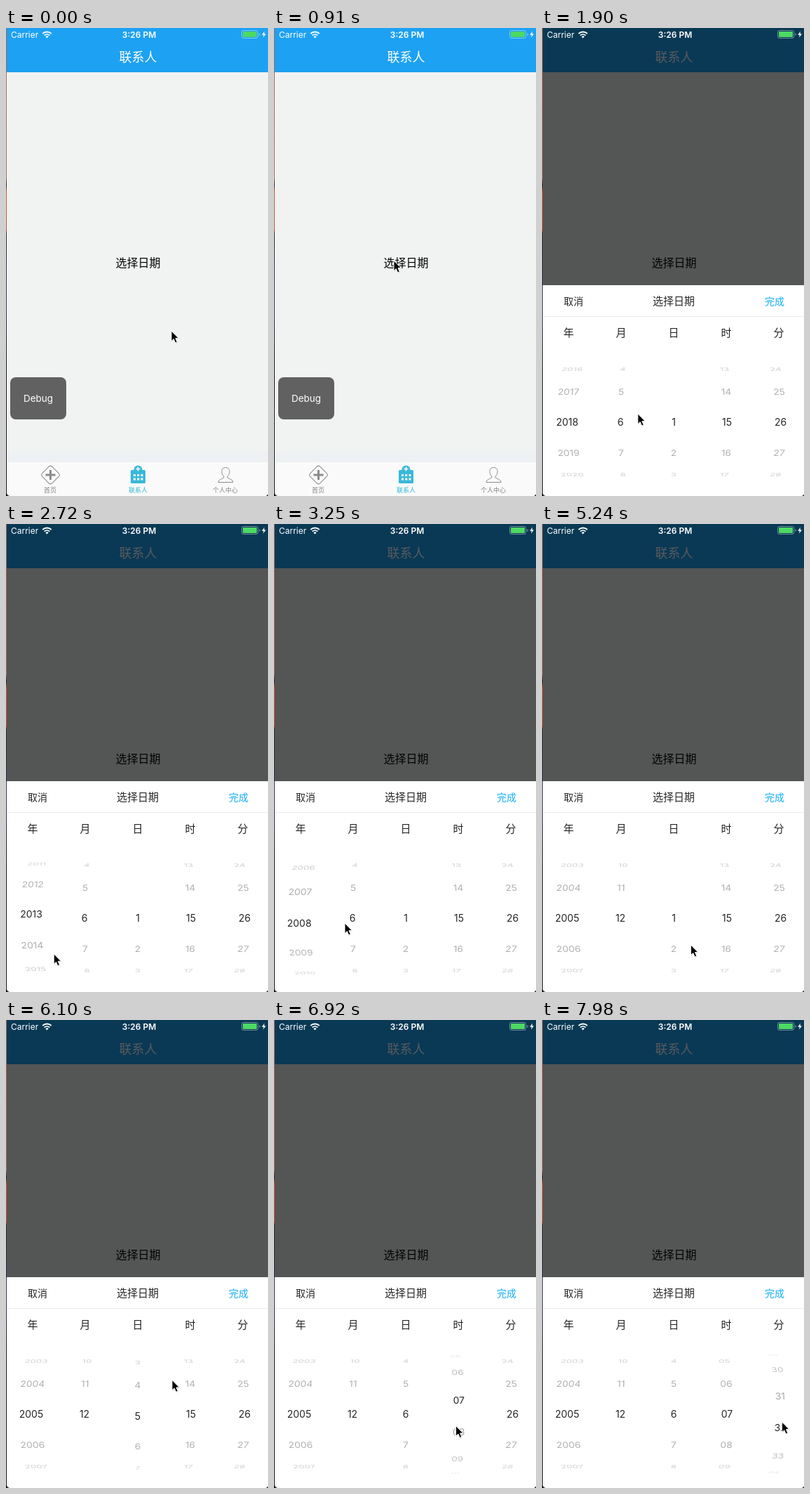
An HTML page for the animation above (8000 ms loop, 374 by 666 pixels).

```html
<!DOCTYPE html>
<html lang="zh-CN">
<head>
<meta charset="utf-8">
<title>Date picker</title>
<style>
  html, body { margin: 0; width: 100%; height: 100%; overflow: hidden; background: #f1f3f3; }
  svg { display: block; width: 374px; height: 666px; }
  text { font-family: Inter, "Noto Sans CJK SC", "Noto Sans CJK", sans-serif; text-anchor: middle; }
  .tab { font-size: 9px; fill: #858585; }
  .head { font-size: 15px; fill: #262626; }
  #wheels text { font-size: 14px; fill: #262626; }
</style>
</head>
<body>
<svg viewBox="0 0 374 666">
  <defs>
    <linearGradient id="edge" x1="0" y1="0" x2="0" y2="1">
      <stop offset="0" stop-color="#b0644c"/>
      <stop offset=".32" stop-color="#a8665a"/>
      <stop offset=".335" stop-color="#2b2220"/>
      <stop offset=".35" stop-color="#d8552a"/>
      <stop offset=".43" stop-color="#cc4f2c"/>
      <stop offset=".44" stop-color="#2a2c38"/>
      <stop offset=".6" stop-color="#2c3a52"/>
      <stop offset=".72" stop-color="#15151b"/>
    </linearGradient>
    <path id="arrow" d="M0 0V14.6L3.3 11.6 5.6 17 8.3 15.8 6 10.6H10.4Z"/>
  </defs>

  <!-- page -->
  <rect width="374" height="666" fill="#f1f3f3"/>
  <rect y="604" width="374" height="14" fill="#eef1f3"/>
  <rect width="374" height="63" fill="#1da1f2"/>
  <text x="188.5" y="47.5" font-size="18" fill="#fff">联系人</text>
  <text x="188.5" y="340" font-size="16">选择日期</text>
  <rect x="6" y="497" width="80" height="60" rx="8" fill="#616161"/>
  <text x="46" y="532" font-size="13.5" fill="#fff">Debug</text>

  <!-- tab bar -->
  <rect y="618" width="374" height="48" fill="#fafafa"/>
  <g stroke="#8c8c8c" fill="none">
    <rect x="53.5" y="626" width="20" height="20" rx="3.5" transform="rotate(45 63.5 636)"/>
    <path d="M63.5 629v14M56.5 636h14" stroke-width="3"/>
    <path d="M313.5 625.5c-4 0-5.8 2.8-5.6 6 .2 3 1.400 5 3 6.400v2c-1.500 1.600-8 2.400-8 6.600h21.200c0-4.200-6.500-5-8-6.600v-2c1.600-1.400 2.800-3.400 3-6.400 .2-3.200-1.600-6-5.600-6z"/>
  </g>
  <g fill="#38b9d8">
    <rect x="178" y="629" width="21" height="19" rx="1.5"/>
    <circle cx="188.5" cy="628.5" r="6"/>
    <path d="M188.5 624.5v6M185.5 627.5h6" stroke="#fff" stroke-width="1.6"/>
    <path d="M182 636.5h13.5M182 642h13.5" stroke="#fff" stroke-width="3" stroke-dasharray="3 2.25"/>
  </g>
  <text class="tab" x="63" y="661.3">首页</text>
  <text class="tab" x="188.5" y="661.3" style="fill:#2fb6d6">联系人</text>
  <text class="tab" x="313" y="661.3">个人中心</text>

  <rect id="dim" width="374" height="666" fill="#000302" opacity=".65"/>

  <!-- status bar -->
  <g fill="#fff">
    <text x="7" y="13.5" font-size="12" style="text-anchor:start">Carrier</text>
    <text x="190" y="13.5" font-size="12" font-weight="600">3:26 PM</text>
    <path d="M52.3 8a9 9 0 0 1 12.4 0M54.7 10.6a5.6 5.6 0 0 1 7.6 0" fill="none" stroke="#fff" stroke-width="1.9"/>
    <path d="M58.5 14.6l-2.1-2.3a3 3 0 0 1 4.2 0z"/>
    <rect x="336.5" y="3.5" width="23" height="11" rx="2.5" fill="none" stroke="#fff" stroke-opacity=".42"/>
    <rect x="338" y="5" width="20" height="8" rx="1.2" fill="#4cd964"/>
    <path d="M361.3 7.300q1.600 .4 1.600 1.800t-1.600 1.800z" fill-opacity=".45"/>
    <path d="M369 4.500l-3.800 5.200h2.600l-.8 4 3.900-5.400h-2.600z"/>
  </g>

  <!-- date sheet -->
  <g id="sheet">
    <rect y="366" width="374" height="300" fill="#fff"/>
    <rect y="410" width="374" height="1" fill="#ededed"/>
    <text x="45" y="393.5" font-size="14" fill="#262626">取消</text>
    <text class="head" x="188" y="394">选择日期</text>
    <text x="332" y="393.5" font-size="14" fill="#14b0fa">完成</text>
    <g id="wheels"></g>
  </g>

  <rect width="1" height="666" fill="url(#edge)"/>
  <path d="M0 661.5h1q.4 3.500 4 4.500H0zM374 663v3h-3q2.500-.5 3-3z" fill="#15151b"/>

  <g id="cursor">
    <use href="#arrow" x=".6" y="1" opacity=".18"/>
    <use href="#arrow" stroke="#fff" stroke-linejoin="round"/>
  </g>
</svg>

<script>
const LOOP = 8000, OPEN = 1120;
const MID_X = 187, MID_Y = 561, RADIUS = 85.7, STEP = 30.5 * Math.PI / 180, DEPTH = 0.09;

// each wheel spins once: from -> to, slowing down between start and end
const columns = [
  { head: "年", x: 36, min: 1900, max: 2100, pad: 4, from: 2018, to: 2005, start: 2380, end: 4050, power: 2.06 },
  { head: "月", x: 112, min: 1, max: 12, pad: 1, from: 6, to: 12, start: 4260, end: 5300, power: 3 },
  { head: "日", x: 188, min: 1, max: 31, pad: 1, from: 1, to: 6, start: 5680, end: 6460, power: 2 },
  { head: "时", x: 264, min: 0, max: 23, pad: 2, from: 15, to: 7, start: 6570, end: 7400, power: 5.3 },
  { head: "分", x: 340.5, min: 0, max: 59, pad: 2, from: 26, to: 32, start: 7400, end: 8250, power: 2.3 }
];

// cursor tip: ms, x, y
const path = [
  [60, 236, 431], [320, 170, 325], [500, 170, 325], [620, 171, 331], [1570, 171, 331],
  [1740, 202, 450], [1900, 137, 549], [2320, 52, 550], [2620, 62, 620], [3250, 101, 568],
  [4250, 114.5, 575], [4500, 122, 431], [5240, 212.5, 599], [5680, 197, 585], [5850, 200, 500],
  [6460, 290, 530], [6640, 254, 500], [6920, 259.5, 577], [7060, 275, 640], [7400, 344, 605],
  [7720, 341, 500], [7980, 342.5, 572]
];

const el = id => document.getElementById(id);
const SLOTS = [-3, -2, -1, 0, 1, 2, 3];

function addText(y, props) {
  const node = document.createElementNS("http://www.w3.org/2000/svg", "text");
  node.setAttribute("y", y);
  for (const key in props) node.setAttribute(key, props[key]);
  el("wheels").append(node);
  return node;
}

columns.forEach((col, i) => {
  const head = addText(439, { x: 38 + 75 * i, style: "font-size:15px" });
  head.textContent = col.head;
  col.texts = SLOTS.map(() => addText(5));
});

function position(col, t) {
  const u = Math.min(1, Math.max(0, (t - col.start) / (col.end - col.start)));
  return col.to + (col.from - col.to) * (1 - u) ** col.power;
}

// rows sit on a cylinder seen from the middle of the sheet
function drawWheel(col, t) {
  const pos = position(col, t), base = Math.round(pos);
  const off = MID_X - col.x;
  SLOTS.forEach((slot, i) => {
    const node = col.texts[i];
    const n = base + slot, angle = (n - pos) * STEP;
    const show = n >= col.min && n <= col.max && Math.abs(angle) < 1.53;
    node.style.display = show ? "" : "none";
    if (!show) return;
    const cos = Math.cos(angle), sin = Math.sin(angle);
    const scale = 1 - DEPTH * (1 - cos);
    const skew = off * DEPTH * sin / RADIUS;
    node.textContent = String(n).padStart(col.pad, "0");
    node.setAttribute("transform",
      `matrix(${scale} 0 ${skew} ${cos} ${MID_X - off * scale} ${MID_Y + RADIUS * sin})`);
    node.setAttribute("opacity", slot ? 0.02 + 0.4 * cos : 1);
  });
}

function cursorAt(t) {
  const i = path.findIndex(p => p[0] > t);
  if (i === 0) return path[0];
  if (i < 0) return path[path.length - 1];
  const a = path[i - 1], b = path[i], u = (t - a[0]) / (b[0] - a[0]);
  return a.map((v, k) => v + (b[k] - v) * u);
}

function draw(t) {
  const open = t >= OPEN;
  el("dim").style.display = el("sheet").style.display = open ? "" : "none";
  if (open) columns.forEach(col => drawWheel(col, t));
  const [, x, y] = cursorAt(t);
  el("cursor").setAttribute("transform", `translate(${x} ${y})`);
}

const begin = performance.now();
function tick() {
  draw((performance.now() - begin) % LOOP);
  requestAnimationFrame(tick);
}
tick();
</script>
</body>
</html>
```
